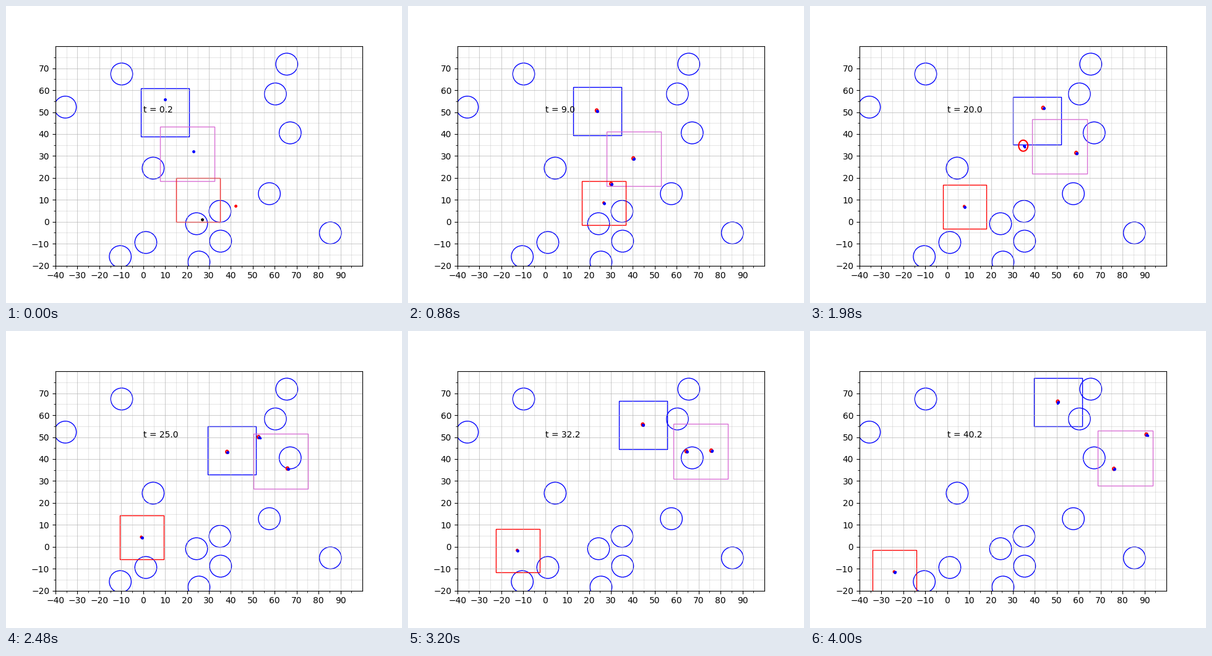
Recreate the animation shown at these times as a matplotlib script. Size 640 by 480 pixels, loop 4020 ms.

```python
import numpy as np
import matplotlib.pyplot as plt
from matplotlib.animation import FuncAnimation
from matplotlib.patches import Circle, Rectangle

FRAMES = 201
TIMES = 0.2 * np.arange(1, FRAMES + 1)
STOPS = (0.2, 9, 20, 32.2, 40.2)
ANGLE = np.linspace(0, 2 * np.pi, 40)
rng = np.random.default_rng(4)


def path(xs, ys):
    """Smooth polynomial track through its positions at STOPS."""
    return np.array([np.polyval(np.polyfit(STOPS, v, 4), TIMES) for v in (xs, ys)])


def ramp(start, end):
    """Smooth step from 0 to 1 between two times."""
    s = np.clip((TIMES - start) / (end - start), 0, 1)
    return s * s * (3 - 2 * s)


class Sensor:
    """Square field of view that settles onto its goal from a start point."""

    def __init__(self, size, color, start, goal):
        gap = np.array(start) - goal[:, 0]
        settle = np.exp(-(TIMES - TIMES[0]) / 2)
        self.corner = goal + np.outer(gap, settle) - size / 2
        self.box = ax.add_patch(Rectangle((0, 0), size, size, fill=False, ec=color))

    def update(self, i):
        self.box.set_xy(self.corner[:, i])


class Target:
    """Tracked point with an uncertainty ring that grows while it is unseen."""

    def __init__(self, pos, first_color="b", found=0.3, lost=None, size=1.2):
        self.pos, self.first_color, self.found = pos, first_color, found
        self.size = np.full(FRAMES, size)
        if lost:
            unseen = (TIMES > lost[0]) & (TIMES < lost[1])
            self.size[unseen] += 0.75 * (TIMES[unseen] - lost[0])
        self.noise = rng.normal(0, 0.22, (2, FRAMES))
        self.ring, = ax.plot([], [], "r-")
        self.reading, = ax.plot([], [], "b.", ms=3)
        self.dot, = ax.plot([], [], "b.", ms=5)

    def update(self, i):
        x, y = self.pos[:, i]
        seen = TIMES[i] > self.found
        self.dot.set_data([x], [y])
        self.dot.set_color("b" if seen else self.first_color)
        r = self.size[i] / 2
        self.ring.set_data(x - 0.25 + r * np.cos(ANGLE),
                           y + 0.2 + 1.2 * r * np.sin(ANGLE))
        nx, ny = self.noise[:, i]
        self.reading.set_data([x + nx], [y + ny])
        for part in (self.ring, self.reading):
            part.set_visible(seen)


fig, ax = plt.subplots(figsize=(6.4, 4.8), dpi=100)
ax.set_aspect("equal")
ax.set(xlim=(-40, 100), ylim=(-20, 80))
for axis, low, high in ((ax.xaxis, -40, 100), (ax.yaxis, -20, 80)):
    axis.set_ticks(np.arange(low, high, 10))
    axis.set_ticks(np.arange(low, high, 5), minor=True)
ax.grid(which="minor", alpha=0.3)
ax.grid(which="major", alpha=0.6)

for center in [(-9.8, 67.4), (-35.5, 52.3), (65.5, 71.9), (60.3, 58.3),
               (67.05, 40.55), (4.55, 24.45), (57.55, 12.8), (35.05, 4.75),
               (24.35, -0.9), (35.3, -8.85), (1.2, -9.45), (-10.45, -15.9),
               (25.45, -18.4), (85.4, -5.1)]:
    ax.add_patch(Circle(center, 5, fill=False, ec="b"))

north = path((10, 23.75, 44, 64.6, 76.3), (55.8, 50.55, 51.75, 43.4, 35.35))
east = path((22.95, 40.45, 59.1, 76, 91.1), (32, 28.7, 31.2, 43.65, 51))
climber = path((27, 30.3, 34.95, 44.75, 50.7), (1, 17.1, 34.5, 55.55, 66))
west = path((42.25, 26.95, 8, -12.55, -23.95), (7.15, 8.45, 6.8, -1.8, -11.6))

# The blue sensor hands over from one target to another; the orchid one
# stays between the targets it shares.
handover = ramp(15, 28)
on_climber = 0.5 * (ramp(10.6, 12.6) - ramp(17.5, 22.5))
on_north = np.clip((TIMES - 16) / 36, 0, 1)
shared = (east * (1 - on_climber - on_north)
          + climber * on_climber + north * on_north)

movers = [
    Sensor(22, "b", (10, 50), north + (climber - north) * handover),
    Sensor(25, "orchid", (20.1, 31), shared),
    Sensor(20, "r", (25, 10), west),
    Target(north),
    Target(east),
    Target(climber, "k", lost=(16, 20.1)),
    Target(west, "r", found=3.5, size=0.7),
]
clock = ax.text(0, 50, "")


def update(i):
    for mover in movers:
        mover.update(i)
    clock.set_text(f"t = {TIMES[i]:.1f}")


anim = FuncAnimation(fig, update, frames=FRAMES, interval=20,
                     repeat=True, repeat_delay=0)
plt.show()
```
